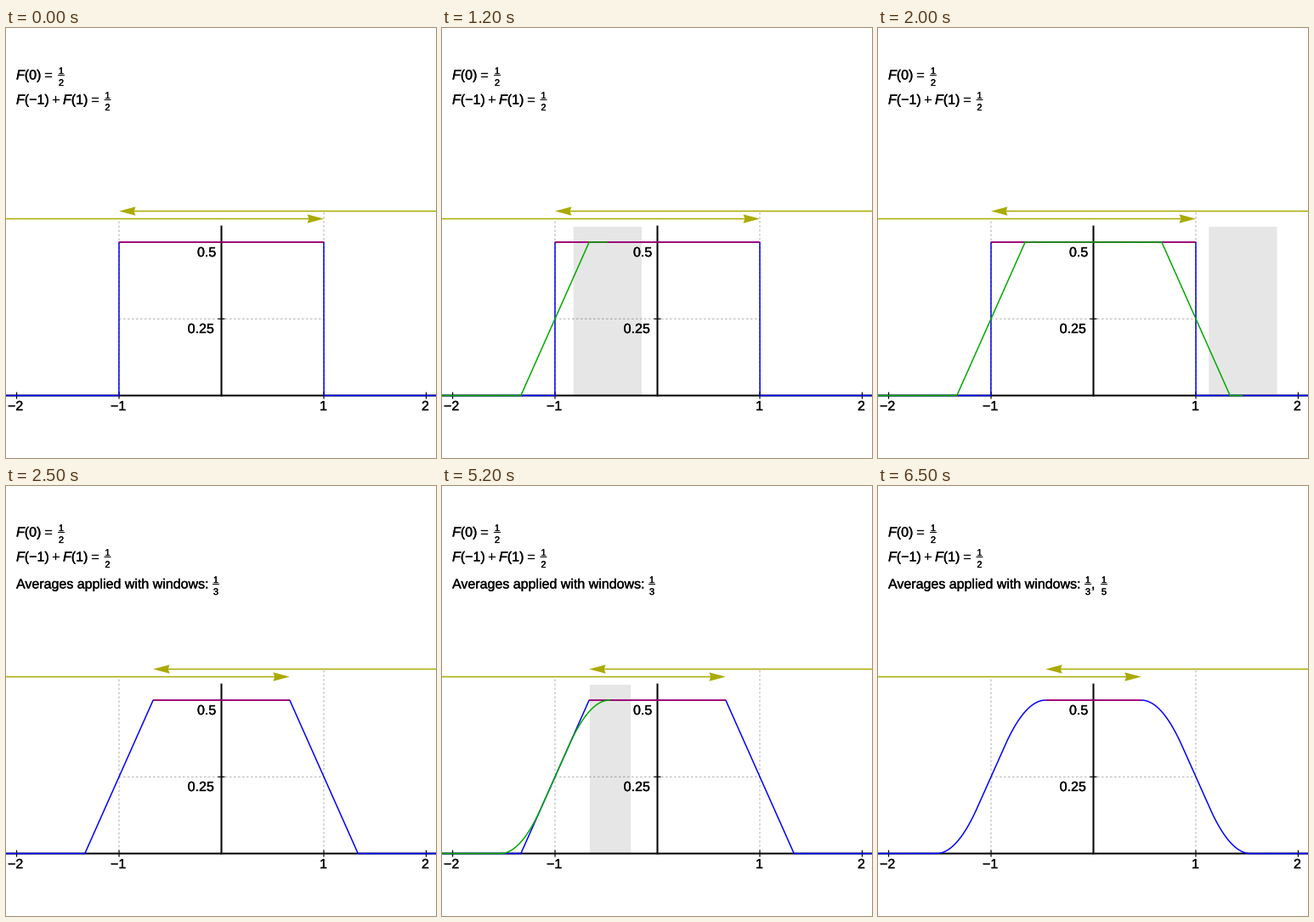
A matplotlib script that plays this animation: 506x506 px, repeating every 8 s.

```python
import numpy as np
import matplotlib.pyplot as plt
from matplotlib.animation import FuncAnimation
from matplotlib.patches import Polygon, Rectangle
from matplotlib.patheffects import withStroke

SIZE, DPI = 506, 64
PX = 72 / DPI                      # points per pixel
CX, UX = 253.5, 120.48             # x origin and pixels per unit
CY, UY = 432.5, 361                # y origin and pixels per unit
EDGE = 2.1                         # half width of the plotted range
WINDOWS = [1 / 3, 1 / 5]
STARTS = [400, 4400]               # ms, window still off stage
SWEEP = 20                         # frames per sweep
STEP = 100                         # ms per frame

BLUE, GREEN, RED, OLIVE = "#0000ff", "#00aa00", "#c00050", "#aaaa00"
GREY, DASH = "#e6e6e6", (0, 0, 0, 0.32)
WIDTH = 1.5                        # curve width in pixels

plt.rcParams["font.family"] = "Liberation Sans"
plt.rcParams["path.snap"] = False


def px(x):
    return CX + UX * np.asarray(x)


def py(y):
    return CY - UY * np.asarray(y)


def average(xs, ys, w):
    """Moving average with half width w."""
    area = np.concatenate([[0], np.cumsum((ys[1:] + ys[:-1]) / 2 * np.diff(xs))])
    return (np.interp(xs + w, xs, area) - np.interp(xs - w, xs, area)) / (2 * w)


xs = np.linspace(-3, 3, 6001)
curves = [np.where(np.abs(xs) <= 1, 0.5, 0.0)]
for w in WINDOWS:
    curves.append(average(xs, curves[-1], w))
flats = [1 - sum(WINDOWS[:k]) for k in range(3)]

fig = plt.figure(figsize=(SIZE / DPI, SIZE / DPI), dpi=DPI, facecolor="white")
ax = fig.add_axes([0, 0, 1, 1])
ax.set_xlim(0, SIZE)
ax.set_ylim(SIZE, 0)
ax.axis("off")


def line(x, y, color, width, z, **kw):
    return ax.plot(x, y, color=color, lw=width * PX, zorder=z,
                   solid_capstyle="butt", dash_capstyle="butt", **kw)[0]


def label(x, y, s, size=16, italic=False):
    return ax.text(x, y, s, fontsize=size * PX, color="black", ha="left",
                   va="baseline", style="italic" if italic else "normal", zorder=9,
                   path_effects=[withStroke(linewidth=0.3 * PX, foreground="black")])


# Guides, axes and ticks
window = ax.add_patch(Rectangle((0, py(0.55)), 0, CY - py(0.55), fc=GREY, lw=0, zorder=1))
for x, y in (([-1, -1], [227.5, CY]), ([1, 1], [217, CY])):
    line(px(x), y, DASH, 1, 4.5, dashes=(2.5, 2.5))
line(px([-1, 1]), py([0.25, 0.25]), DASH, 1, 2, dashes=(2.5, 2.5))
line([0, SIZE], [CY, CY], "black", 2, 3)
line([CX, CX], [232.5, CY + 1], "black", 2, 3)
for x in (-2, -1, 1, 2):
    line(px([x, x]), [CY - 4, CY + 4], "black", 1.2, 3)
for y in (0.25, 0.5):
    line([CX - 4, CX + 4], py([y, y]), "black", 1.2, 3)

label(225, 269, "0.5")
label(213.7, 359, "0.25")
for x, s in ((2, "\u22122"), (123, "\u22121"), (369, "1"), (489, "2")):
    label(x, 450, s)

# Curves and arrows
blue = line([], [], BLUE, WIDTH, 4)
red = line([], [], RED, WIDTH, 5)
green = line([], [], GREEN, WIDTH, 6)
shafts = [line([], [], OLIVE, WIDTH, 7) for _ in range(2)]
heads = [ax.add_patch(Polygon(np.zeros((4, 2)), fc=OLIVE, lw=0, zorder=7))
         for _ in range(2)]


def fraction(x, base, den):
    return [label(x - 3.1, base - 6.5, "1", 11),
            label(x - 3.1, base + 7.5, den, 11),
            line([x - 4, x + 4], [base - 5] * 2, "black", 1, 9)]


def formulas(shift):
    a, b = 60.5 - shift, 89.5 - shift
    parts = [label(12, a, "F", italic=True), label(21.8, a, "(0)"), label(45, a, "="),
             label(12, b, "F", italic=True), label(21.8, b, "(\u22121)"),
             label(54, b, "+"),
             label(67, b, "F", italic=True), label(76.8, b, "(1)"), label(100, b, "=")]
    return parts + fraction(65, a, "2") + fraction(119.5, b, "2")


def averages(count):
    base = 120.5
    parts = [label(12, base, "Averages applied with windows:")]
    parts += fraction(247, base, "3")
    if count > 1:
        parts += [label(251, base, ",")] + fraction(266, base, "5")
    return parts


texts = [formulas(0), formulas(1) + averages(1), formulas(1) + averages(2)]


def set_arrow(i, tip, y, way):
    start = 0 if way > 0 else SIZE
    shafts[i].set_data([start, tip - way * 14], [y, y])
    heads[i].set_xy([(tip, y), (tip - way * 19.5, y - 5.2),
                     (tip - way * 17.5, y), (tip - way * 19.5, y + 5.2)])


def draw(frame):
    t = frame * STEP
    stage = sum(t > s + SWEEP * STEP for s in STARTS)
    flat = flats[stage]
    blue.set_data(px(xs), py(curves[stage]))
    red.set_data(px([-flat, flat]), py([0.5, 0.5]))
    set_arrow(0, px(flat), 224.5, 1)
    set_arrow(1, px(-flat), 215.5, -1)
    for k, group in enumerate(texts):
        for part in group:
            part.set_visible(k == stage)

    sweeping = stage < len(STARTS) and t > STARTS[stage]
    window.set_visible(sweeping)
    green.set_visible(sweeping)
    if sweeping:
        w = WINDOWS[stage]
        done = (t - STARTS[stage]) / (SWEEP * STEP)
        mid = (EDGE + w) * (2 * done - 1)
        window.set_x(px(mid - w))
        window.set_width(2 * w * UX)
        seen = xs <= mid
        green.set_data(px(xs[seen]), py(curves[stage + 1][seen]))
    return []


anim = FuncAnimation(fig, draw, frames=80, init_func=lambda: draw(0),
                     interval=STEP, repeat=True, repeat_delay=0, blit=False)
plt.show()
```
